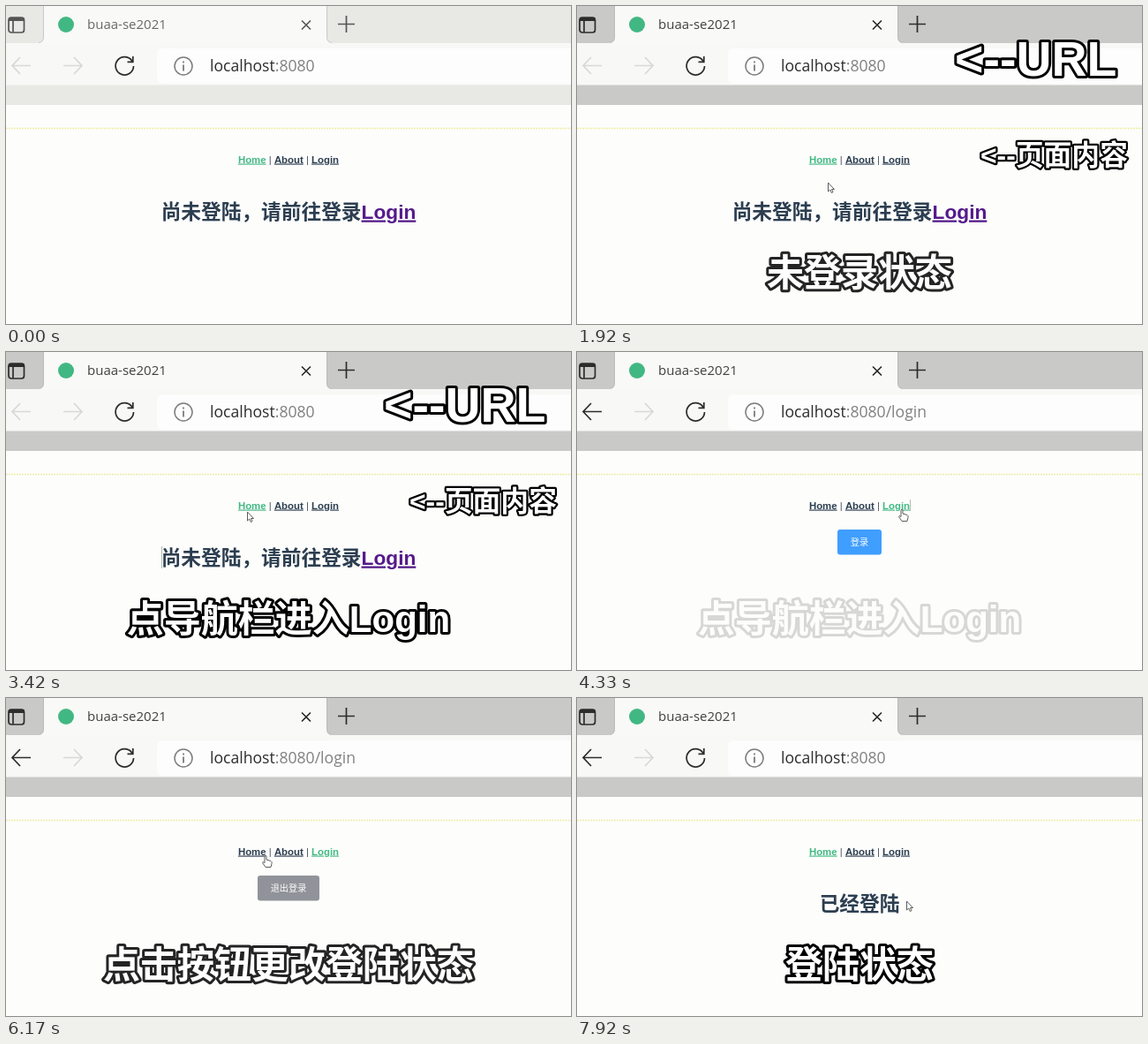
These frames come from a looping animation (640x360 px, 8000 ms). An HTML page:

```html
<!DOCTYPE html>
<html lang="zh-CN">
<head>
<meta charset="utf-8">
<title>Login flow</title>
<style>
  html, body { margin: 0; height: 100%; overflow: hidden; background: #fdfdfc; }
  svg { display: block; width: 100vw; height: 100vh; }
  text { font-family: "Liberation Sans", "Noto Sans CJK SC", "Noto Sans CJK", sans-serif; }
  .ui text { font-family: "Open Sans", "Noto Sans", sans-serif; }
  .line { fill: none; stroke: #2c2c2c; stroke-width: 1.7; }
  .faint { stroke: #d8d8d4; }
  .mid { text-anchor: middle; }
  .nav { font-size: 11.4px; }
  .nav tspan { font-weight: 700; text-decoration: underline; }
  .head { font-size: 22.7px; font-weight: 700; fill: #2c3e50; }
  .btn { font-size: 10.2px; fill: #fff; }
  .cap { font-weight: 700; fill: #fff; stroke: #000; stroke-width: 6; stroke-linejoin: round; paint-order: stroke; }
  .big { font-size: 42px; }
  .pointer { fill: #fff; stroke: #5c5c5c; stroke-width: 1; stroke-linejoin: round; }
</style>
</head>
<body>
<svg viewBox="0 0 640 360" preserveAspectRatio="none">
  <rect width="640" height="360" fill="#fdfdfc"/>

  <g class="ui">
    <rect class="strip" width="640" height="44"/>
    <path d="M36 42Q43 42 43 35V0H363V35Q363 42 370 42Z" fill="#f9f9f7"/>
    <path d="M37 41.5Q42.5 41 42.5 35V0M363.5 0V35Q363.5 41 369 41.5" fill="none" stroke="#aaa" stroke-opacity=".5"/>
    <rect y="42" width="640" height="48" fill="#f8f8f6"/>
    <path d="M640 48H178Q171 48 171 55V81Q171 88 178 88H640Z" fill="#fdfdfd"/>
    <rect class="strip" y="89.5" width="640" height="22.5"/>
    <path d="M0 138.5H640" stroke="#efeca6" stroke-width="1.5" stroke-dasharray="2 1"/>

    <g class="tabs">
      <rect class="line" x="3" y="13" width="17.5" height="17" rx="3"/>
      <path class="line" d="M3 15H20.5" style="stroke-width:4"/>
      <path class="line" d="M8 16V30"/>
      <text x="92" y="26" font-size="15" fill="#404040">buaa-se2021</text>
      <path class="line" d="M335 16.5L345 26.5M345 16.5L335 26.5M376 20.5H395M385.5 11V30"/>
    </g>
    <circle cx="68" cy="21" r="9" fill="#41b883"/>

    <path id="back" class="line" d="M28 67.500H7M16 58L7 67.500L16 77"/>
    <path class="line faint" d="M65 67.500H86M77 58L86 67.500L77 77"/>
    <path class="line" d="M143 62.500A10.200 10.200 0 1 0 144.500 68M143.800 57V63.300H137.500"/>
    <g fill="none" stroke="#7c7c7c" stroke-width="1.5">
      <circle cx="201" cy="68" r="10"/>
      <path d="M201 66.500V73.500M201 62.500V64.500" stroke-width="1.8"/>
    </g>
    <text x="231" y="74" font-size="17.6" fill="#2c2c2c">localhost<tspan fill="#808080">:8080<tspan id="path"></tspan></tspan></text>
  </g>

  <text class="nav mid" x="320" y="177.5" fill="#4a5660"><tspan id="home">Home</tspan> | <tspan fill="#2c3e50">About</tspan> | <tspan id="login">Login</tspan></text>

  <text id="guest" class="head mid" x="320" y="240.5">尚未登陆，请前往登录<tspan fill="#551a8b" text-decoration="underline">Login</tspan></text>
  <text id="member" class="head mid" x="320" y="240.5">已经登陆</text>
  <g id="signIn">
    <rect x="295" y="201" width="50" height="28.500" rx="3" fill="#409eff"/>
    <text class="btn mid" x="320" y="219">登录</text>
  </g>
  <g id="signOut">
    <rect x="285" y="201" width="70" height="28.500" rx="3" fill="#909399"/>
    <text class="btn mid" x="320" y="219">退出登录</text>
  </g>
  <path id="caret" stroke="#b4bcae"/>

  <g id="labels">
    <text class="cap" x="428" y="79" font-size="55.5">&lt;--URL</text>
    <text class="cap" x="457" y="180" font-size="31.800" style="stroke-width:4.5">&lt;--页面内容</text>
  </g>
  <g id="captions"></g>

  <g id="cursor" class="pointer">
    <path id="arrow" d="M.5 0V10L2.800 8L4.300 11.500L6 10.700L4.500 7.500H7.500Z"/>
    <path id="hand" d="M-1 1Q0-.5 1 1V5L6 6.500Q7.500 7 7 9.500L6 13.500H0L-3.500 8.500Q-3.500 6.500-1 8.500Z"/>
  </g>
</svg>

<script>
const DURATION = 8000, STEP = 1000 / 12, FADE = 250;
const FOCUS = 1170, OPEN_LOGIN = 4250, SIGN_IN = 5330, GO_HOME = 6250;
const ACTIVE = "#42b983", INK = "#2c3e50";
const $ = id => document.getElementById(id);
const clamp = v => Math.max(0, Math.min(1, v));
const show = (id, on) => $(id).style.display = on ? "" : "none";

// text, fade-in start, fade-out start
const captions = [
  ["未登录状态", 80, 1880],
  ["点导航栏进入Login", 2330, 4120],
  ["点击按钮更改登陆状态", 4670, 6130],
  ["登陆状态", 6750, Infinity]
].map(([text, start, end]) => {
  const el = document.createElementNS("http://www.w3.org/2000/svg", "text");
  el.setAttribute("class", "cap big mid");
  el.setAttribute("x", 320);
  el.setAttribute("y", 316.5);
  el.textContent = text;
  $("captions").append(el);
  return { el, start, end };
});

// time, x, y of the pointer tip
const track = [
  [1000, 250, 262], [1500, 284, 200], [2600, 284, 200], [3200, 273, 181],
  [3600, 273, 181], [4100, 368, 178], [4500, 368, 178], [5050, 322, 216],
  [5550, 322, 216], [6080, 294, 178], [6400, 294, 178], [7200, 373, 230], [8000, 373, 230]
];

function pointerAt(t) {
  const i = Math.max(1, track.findIndex(k => k[0] > t));
  const [t0, x0, y0] = track[i - 1], [t1, x1, y1] = track[i];
  const p = clamp((t - t0) / (t1 - t0)), e = p * p * (3 - 2 * p);
  return [x0 + (x1 - x0) * e, y0 + (y1 - y0) * e];
}

const within = (x, y, l, t, r, b) => x >= l && x <= r && y >= t && y <= b;
const opacity = (t, start, end) => clamp((t - start) / FADE) * (1 - clamp((t - end) / FADE));

function render(t) {
  const loginPage = t >= OPEN_LOGIN && t < GO_HOME;
  const signedIn = t >= SIGN_IN;
  const focused = t >= FOCUS;

  document.querySelectorAll(".strip").forEach(el => el.style.fill = focused ? "#c9c9c7" : "#e8e8e5");
  document.querySelector(".tabs").style.opacity = focused ? 1 : .78;
  $("back").classList.toggle("faint", t < OPEN_LOGIN);
  $("path").textContent = loginPage ? "/login" : "";
  $("home").style.fill = loginPage ? INK : ACTIVE;
  $("login").style.fill = loginPage ? ACTIVE : INK;
  show("guest", !loginPage && !signedIn);
  show("member", !loginPage && signedIn);
  show("signIn", loginPage && !signedIn);
  show("signOut", loginPage && signedIn);

  show("caret", t >= 3000 && t < 5000);
  $("caret").setAttribute("d", loginPage ? "M377.5 167V180" : "M176.5 220V245");

  $("labels").style.opacity = opacity(t, 80, 3920);
  captions.forEach(c => c.el.style.opacity = opacity(t, c.start, c.end));

  const [x, y] = pointerAt(t);
  const overLink = within(x, y, 263, 166, 295, 180) || within(x, y, 346, 166, 377, 180);
  const overButton = loginPage && within(x, y, 295, 201, 345, 229);
  show("cursor", t >= track[0][0]);
  show("hand", overLink || overButton);
  show("arrow", !overLink && !overButton);
  $("cursor").setAttribute("transform", `translate(${x} ${y})`);
}

const began = performance.now();
function tick() {
  const t = (performance.now() - began) % DURATION;
  render(Math.floor((t + 4) / STEP) * STEP % DURATION);
  requestAnimationFrame(tick);
}
tick();
</script>
</body>
</html>
```
